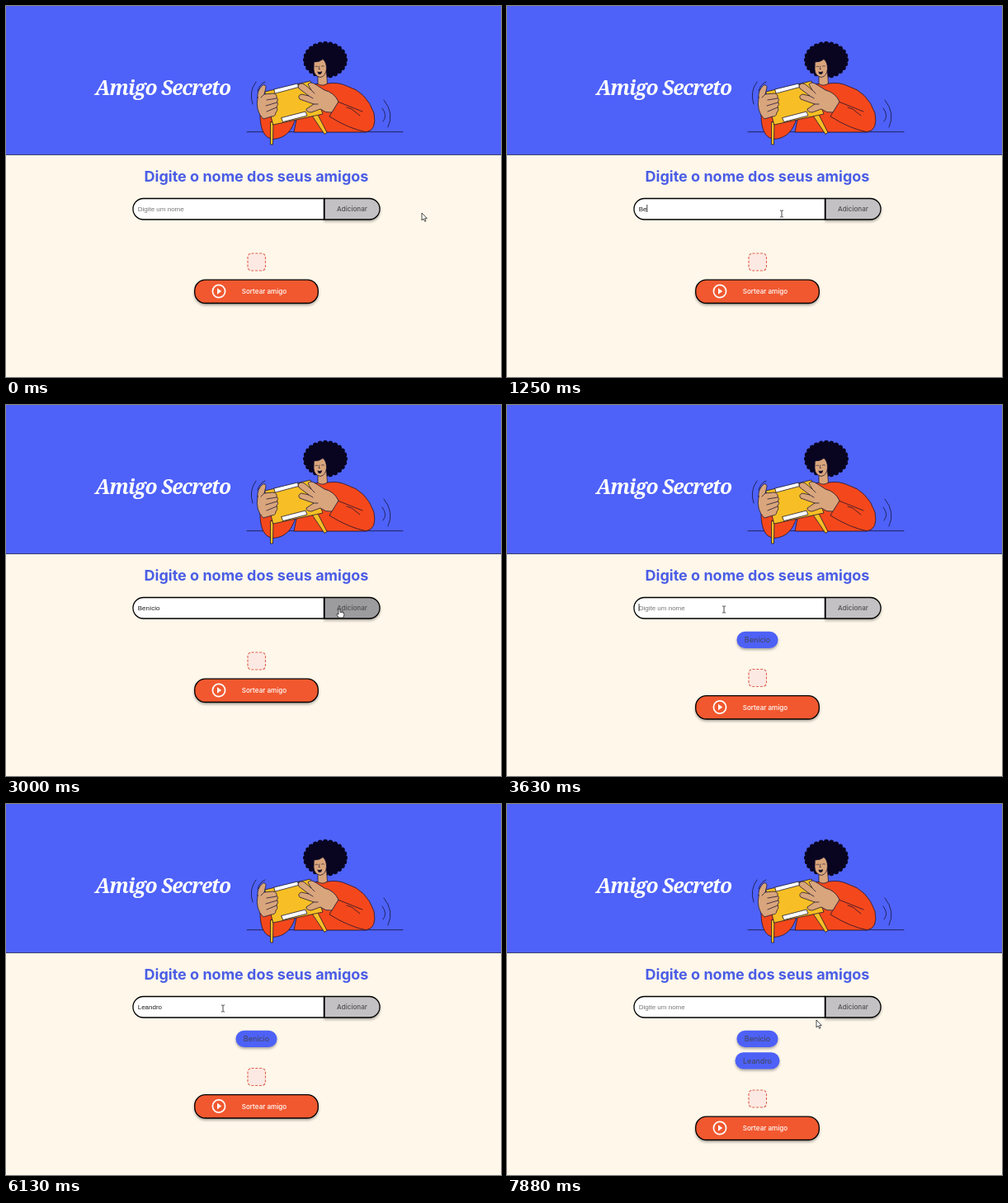
These frames come from a looping animation (600x450 px, 8000 ms). An HTML page:

```html
<!DOCTYPE html>
<html lang="pt-BR">
<head>
<meta charset="utf-8">
<title>Amigo Secreto</title>
<style>
html, body { margin: 0; height: 100%; overflow: hidden; background: #fef7ea; }
svg { display: block; width: 100vw; height: 100vh; }
text { font-family: Inter, sans-serif; }
.title { font: italic 900 24.5px "Noto Serif", serif; letter-spacing: -.045em; fill: #fff; }
.heading { font-size: 18px; font-weight: 700; fill: #4a5de6; }
.entry { font-family: "Liberation Sans", Arial, sans-serif; font-size: 8px; }
.label { font-size: 8.1px; font-weight: 500; }
.chip text { font-size: 9px; fill: #444452; }
.mid { text-anchor: middle; }
.shadow { filter: drop-shadow(0 2px 1.5px rgba(0, 0, 0, .3)); }
.edge { stroke: #000; stroke-width: 1.3; }
.art { stroke: #15102c; stroke-width: .75; stroke-linejoin: round; stroke-linecap: round; }
.skin { fill: #d9a57c; }
.shirt { fill: #f4481c; }
.drum { fill: #f7bf25; }
.line { fill: none; }
</style>
</head>
<body>
<svg viewBox="0 0 600 450" preserveAspectRatio="none">
  <rect width="600" height="450" fill="#fef7ea"/>
  <rect width="600" height="180" fill="#4e62f9"/>
  <rect y="180" width="600" height="1" fill="#3a3d70"/>
  <text class="title mid" x="190" y="107.5">Amigo Secreto</text>

  <g class="art">
    <path class="line" d="M292 152.7H481M303 92Q294 104 299 119M314 92Q307 95 305 103M458 114Q471 130 463 147M456 124Q463 133 457 140"/>
    <path class="shirt" d="M308 132Q308 160 324 161.500Q345 160 351 136Z"/>
    <path class="shirt" d="M362 98Q370 94 378 94.500L390 94Q403 92 413 97Q437 104 446 130Q450 151 436 153H349L352 138Z"/>
    <g id="hair" fill="#090521" stroke="none"></g>
    <path class="skin" d="M378 82V94.500Q384 98 389.500 94L388.500 80Z"/>
    <path class="skin" d="M373.500 68Q380 68 384 64.500Q388.500 68 388.500 76Q388 85 381 86.500Q373.500 85 373 77Z"/>
    <path class="line" stroke-width=".6" d="M375 73.500q1.500-1 3 0M382.500 73q1.500-1 3 0M380 73l-1 3.500h1.500"/>
    <path fill="#15102c" stroke="none" d="M377.500 79.500q3 1 5.500-.5q0 3.500-2.500 4q-2.500 0-3-3.500Z"/>
    <path class="drum" d="M320.500 141V168H323.500L324 141ZM371 133L386 155.500L389 153.500L377 130Z"/>
    <path class="drum" d="M314 104L369 91L384 131L324 144Z"/>
    <path fill="#fff" d="M325 101L353.500 94L354.500 98.500L326.500 106ZM334 135.500L363 128L365 133L336 140.500Z"/>
    <path class="skin" d="M305 111Q304 103 311 96Q315 95 315 99L313 107L324 106Q329 107 328 111Q331 114 328.500 116Q331 120 328 122Q330 127 327 129Q327 134 322 134L312 137Q302 128 305 111Z"/>
    <path class="line" d="M313 107L309 111M328 112L316 114M328.500 117L315 121M328 123L316 128"/>
    <path class="shirt" stroke="none" d="M402 116L432 128L437 153Q416 149 392 134Z"/>
    <path class="line" d="M437 153Q416 149 392 134L402 116L432 128M413 123l6 2 10 8"/>
    <path class="skin" d="M355 95Q359 92 364 97L370 102L366 95Q369 91 375 95L386 102Q398 105 403 116L395 129Q387 130 381 125L370 129Q364 129 364 125L373 119L356 113Q353 109 358 107L367 109L355 100Q353 97 355 95Z"/>
    <path class="line" d="M370 102l4 4M367 109l5 3M373 119l5 0"/>
  </g>

  <text class="heading mid" x="303.500" y="213">Digite o nome dos seus amigos</text>

  <path class="edge" d="M385.500 233.500H166.500a12.500 12.700 0 0 0 0 25.500H385.500Z" fill="#fff"/>
  <g class="shadow">
    <path id="add" class="edge" d="M386 233.500H440.500a12.500 12.700 0 0 1 0 25.500H386Z"/>
  </g>
  <text class="label mid" x="419.500" y="249" fill="#505054">Adicionar</text>
  <text id="entry" class="entry" x="159.700" y="248.500"></text>
  <path id="caret" d="M0 241V250" stroke="#111" stroke-width=".8"/>

  <g id="chips"></g>

  <g id="lower">
    <rect x="293" y="300" width="21.500" height="21" rx="4.500" fill="#fce9e3" stroke="#e0604c" stroke-width="1.1" stroke-dasharray="3 1.800"/>
    <rect class="shadow edge" x="228.700" y="332.200" width="149.600" height="28.300" rx="13" fill="#f1582f"/>
    <circle cx="258" cy="346" r="7.600" fill="none" stroke="#fff" stroke-width="1.700"/>
    <path d="M256 342.300V349.700L261.200 346Z" fill="#fff"/>
    <text class="label mid" x="313" y="349.300" fill="#fff">Sortear amigo</text>
  </g>

  <g id="pointer">
    <path id="arrow" d="M0 0V9L2.100 7.100L3.600 10.300L5 9.700L3.600 6.600H6.300Z" fill="#fff" stroke="#222" stroke-width=".8"/>
    <path id="beam" d="M-2-4H-.5L0-3.500L.5-4H2M0-3.500V3.500M-2 4H-.5L0 3.500L.5 4H2" fill="none" stroke="#333" stroke-width=".9"/>
    <path id="hand" d="M-1 1Q0-1 1 1V4.500Q2 3.500 2.800 5Q4 0 4.300 5.300Q6 4.500 5.800 6.500V8L4.600 11H-.5L-3.500 7Q-3.500 5.500-1 7Z" fill="#fff" stroke="#222" stroke-width=".8"/>
  </g>
</svg>
<script>
const $ = id => document.getElementById(id);
const show = (el, on) => el.style.display = on ? "" : "none";
const LOOP = 8000, ROUND = 4000, STEP = 125;
const names = ["Benício", "Leandro"];
const moves = [
  { from: 0, to: 625, x: 333, y: 252 },
  { from: 2625, to: 3000, x: 404, y: 247 },
  { from: 3500, to: 3625, x: 263, y: 248 },
  { from: 6875, to: 7000, x: 405, y: 247 },
  { from: 7375, to: 7875, x: 375, y: 262 }
];
const focusTimes = [875, 3625];

// Curly outline: small lobes around a filled ellipse.
let hair = '<ellipse cx="387" cy="65.3" rx="25" ry="20.5"/>';
for (let i = 0; i < 24; i++) {
  const a = i * Math.PI / 12;
  hair += `<circle cx="${387 + 24 * Math.cos(a)}" cy="${65.3 + 19.5 * Math.sin(a)}" r="3"/>`;
}
$("hair").innerHTML = hair;

$("chips").innerHTML = names.map((name, i) => {
  const width = 50 + 4 * i, y = 274.7 + 26.5 * i;
  return `<g class="chip"><rect class="shadow" x="${303.5 - width / 2}" y="${y}" width="${width}" height="20.3" rx="10" fill="#4d61f7"/>
    <text class="mid" x="303.5" y="${y + 13.5}">${name}</text></g>`;
}).join("");

function pointerAt(t) {
  let x = 504, y = 251;
  for (const m of moves) {
    const p = Math.min(1, Math.max(0, (t - m.from) / (m.to - m.from)));
    x += (m.x - x) * p;
    y += (m.y - y) * p;
  }
  return [x, y];
}

// Two letters, a pause, then one letter per step until the name is added.
function lettersAt(u) {
  if (u < 1000 || u >= 3250) return 0;
  return u < 1750 ? 2 : Math.min(7, 4 + Math.floor((u - 1750) / STEP));
}

function drawPointer(t) {
  const [x, y] = pointerAt(t);
  const inRow = y > 233 && y < 259;
  const onAdd = inRow && x > 386 && x < 453;
  const onField = inRow && x > 154 && x <= 386;
  $("pointer").setAttribute("transform", `translate(${x} ${y})`);
  show($("hand"), onAdd);
  show($("beam"), onField);
  show($("arrow"), !onAdd && !onField);
  $("add").setAttribute("fill", onAdd ? "#9c9b9d" : "#c3c1c3");
}

function drawEntry(t) {
  const entry = $("entry"), name = names[Math.floor(t / ROUND)];
  const count = lettersAt(t % ROUND);
  entry.textContent = count ? name.slice(0, count) : "Digite um nome";
  entry.setAttribute("fill", count ? "#1c1c1c" : "#757575");
  const end = count ? entry.getComputedTextLength() : 0;
  const focused = focusTimes.some(f => t >= f && t < f + 500);
  $("caret").setAttribute("transform", `translate(${160 + end} 0)`);
  show($("caret"), focused || count > 0 && count < name.length);
}

function drawChips(t) {
  const added = Math.floor((t + ROUND - 3250) / ROUND);
  [...$("chips").children].forEach((chip, i) => show(chip, i < added));
  $("lower").setAttribute("transform", `translate(0 ${added && 26.5 * added - 6})`);
}

const start = performance.now();
function tick() {
  const now = (performance.now() - start) % LOOP;
  const t = Math.floor(now / STEP) * STEP;
  drawPointer(t);
  drawEntry(t);
  drawChips(t);
  requestAnimationFrame(tick);
}
tick();
</script>
</body>
</html>
```
